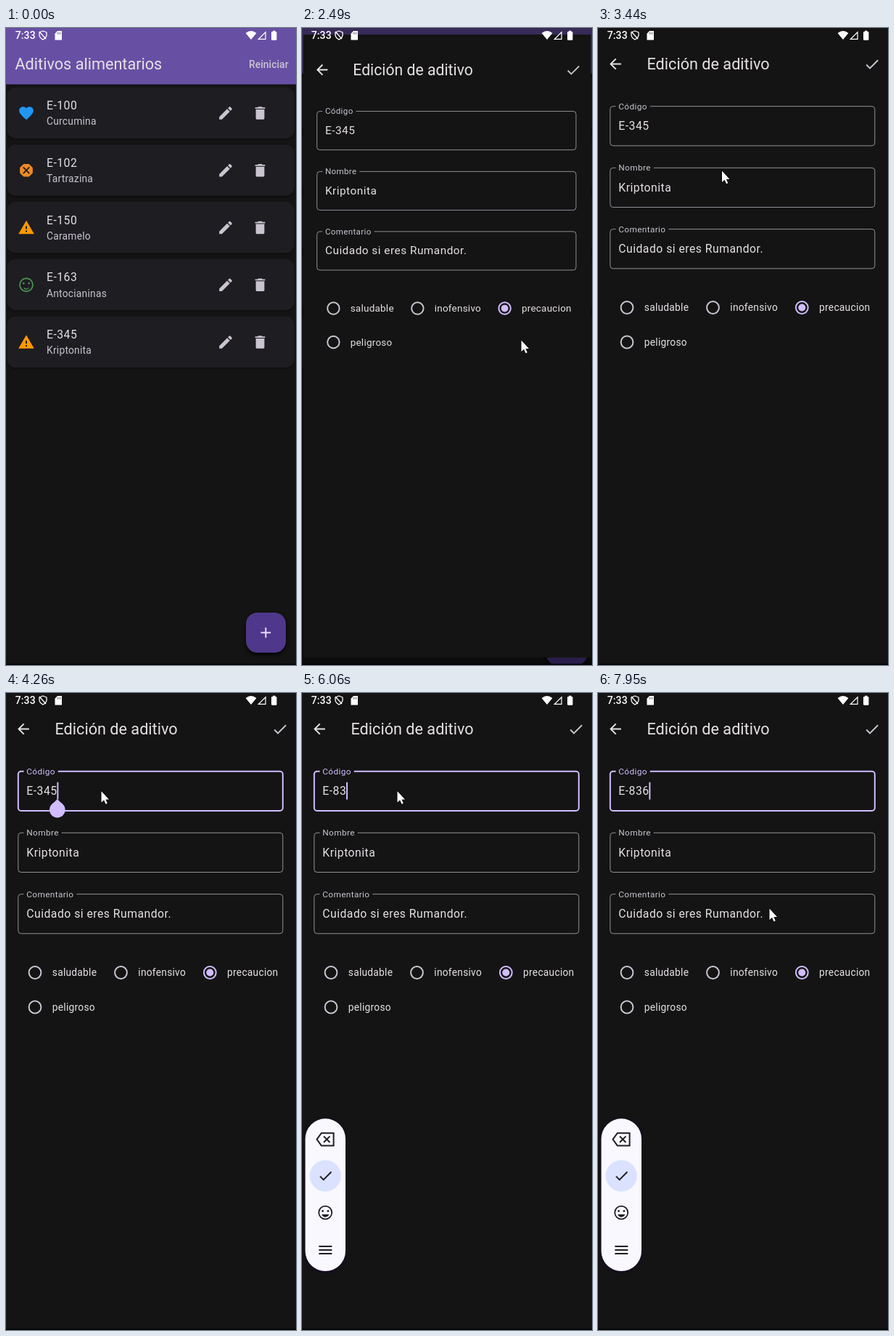
An HTML page with a canvas that plays this animation: 400 by 876 pixels, repeating every 8000 ms.

```html
<!DOCTYPE html>
<html lang="es">
<head>
<meta charset="utf-8">
<title>Aditivos alimentarios</title>
<style>
html, body { margin: 0; width: 100%; height: 100%; overflow: hidden; background: #141414; }
canvas { display: block; width: 400px; height: 876px; }
</style>
</head>
<body>
<canvas id="stage"></canvas>
<script>
const LOOP = 8000, W = 400, H = 876;
const canvas = document.getElementById('stage');
const ctx = canvas.getContext('2d');
const dpr = window.devicePixelRatio || 1;
canvas.width = W * dpr;
canvas.height = H * dpr;

const C = {
  bg: '#141414', card: '#1d1d22', bar: '#6750a4', fab: '#4f378b', accent: '#d0bcff',
  text: '#e6e1e5', soft: '#cac4d0', line: '#938f99', ink: '#1f1f23', pill: '#faf8ff'
};

const paths = {
  heart: 'M12 21.35l-1.45-1.32C5.4 15.36 2 12.28 2 8.5 2 5.42 4.42 3 7.5 3c1.74 0 3.41.81 4.5 2.09C13.09 3.81 14.76 3 16.5 3 19.58 3 22 5.42 22 8.5c0 3.78-3.4 6.86-8.55 11.54z',
  danger: 'M15.73 3H8.27L3 8.27v7.46L8.27 21h7.46L21 15.73V8.27zM17 15.74L15.74 17 12 13.26 8.26 17 7 15.74 10.74 12 7 8.26 8.26 7 12 10.74 15.74 7 17 8.26 13.26 12z',
  warning: 'M1 21h22L12 2zm12-3h-2v-2h2zm0-4h-2v-4h2z',
  edit: 'M3 17.25V21h3.75L17.81 9.94l-3.75-3.75zM20.71 7.04c.39-.39.39-1.02 0-1.41l-2.34-2.34c-.39-.39-1.02-.39-1.41 0l-1.83 1.83 3.75 3.75z',
  trash: 'M6 19c0 1.1.9 2 2 2h8c1.1 0 2-.9 2-2V7H6zM19 4h-3.5l-1-1h-5l-1 1H5v2h14z',
  add: 'M19 13h-6v6h-2v-6H5v-2h6V5h2v6h6z',
  back: 'M20 11H7.83l5.59-5.59L12 4l-8 8 8 8 1.41-1.41L7.83 13H20z',
  check: 'M9 16.17L4.83 12l-1.42 1.41L9 19 21 7l-1.41-1.41z',
  menu: 'M3 18h18v-2H3zM3 13h18v-2H3zM3 6v2h18V6z'
};
const icons = {};
for (const k in paths) icons[k] = new Path2D(paths[k]);

function icon(name, cx, cy, color, size = 23.6) {
  const s = size / 24;
  ctx.save();
  ctx.translate(cx - size / 2, cy - size / 2);
  ctx.scale(s, s);
  ctx.fillStyle = color;
  ctx.fill(icons[name], 'evenodd');
  ctx.restore();
}

function text(str, x, y, size, color, spacing = 0, weight = 400) {
  ctx.font = `${weight} ${size}px Roboto, sans-serif`;
  ctx.letterSpacing = spacing + 'px';
  ctx.fillStyle = color;
  ctx.fillText(str, x, y);
  return ctx.measureText(str).width;
}

function box(x, y, w, h, r, color) {
  ctx.beginPath();
  ctx.roundRect(x, y, w, h, r);
  ctx.fillStyle = color;
  ctx.fill();
}

function disc(x, y, r, color) {
  ctx.beginPath();
  ctx.arc(x, y, r, 0, 7);
  ctx.fillStyle = color;
  ctx.fill();
}

function ring(x, y, r, width, color) {
  ctx.beginPath();
  ctx.arc(x, y, r, 0, 7);
  ctx.lineWidth = width;
  ctx.strokeStyle = color;
  ctx.stroke();
}

function line(points, width, color, close) {
  ctx.beginPath();
  for (let i = 0; i < points.length; i += 2) ctx.lineTo(points[i], points[i + 1]);
  if (close) ctx.closePath();
  ctx.lineWidth = width;
  ctx.strokeStyle = color;
  ctx.stroke();
}

function shade(color, blur, dy) {
  ctx.shadowColor = color;
  ctx.shadowBlur = blur * dpr;
  ctx.shadowOffsetY = dy * dpr;
}

function face(cx, cy, r, color, mouth) {
  ring(cx, cy, r, 1.8, color);
  disc(cx - 3.7, cy - 2.2, 1.4, color);
  disc(cx + 3.7, cy - 2.2, 1.4, color);
  mouth();
}

// Number of the current step (0 before the start, n from the end on)
function stepOf(t, t0, t1, n) {
  if (t < t0) return 0;
  return Math.min(n, 1 + Math.floor((t - t0) / (t1 - t0) * (n - 1) + 0.02));
}

// [start, end, steps, points evenly spread over the steps]
const moves = [
  [800, 1560, 12, [372, 581, 344, 508, 319, 455, 306, 434, 302.5, 429.5]],
  [2880, 2950, 2, [291, 426, 301.5, 428]],
  [3160, 3860, 11, [290, 410, 231, 300, 171, 196.5, 132, 141, 117, 120, 131.5, 135]],
  [7260, 7810, 9, [133, 139, 148, 208, 163, 278, 169, 295.5]],
  [7880, 7950, 2, [205, 296, 236.5, 296.5]]
];

function mouseAt(t) {
  let pos = null;
  for (const [t0, t1, n, p] of moves) {
    const k = stepOf(t, t0, t1, n);
    if (!k) break;
    const legs = p.length / 2 - 1;
    const u = (k - 1) / (n - 1) * legs;
    const i = Math.min(legs - 1, Math.floor(u)), f = u - i;
    pos = [0, 1].map(a => p[2 * i + a] + (p[2 * i + 2 + a] - p[2 * i + a]) * f);
  }
  return pos;
}

function drawMouse([x, y]) {
  ctx.save();
  ctx.translate(x, y);
  const shape = [0, 0, 0, 15.5, 3.6, 12.2, 6, 17.8, 8.3, 16.8, 6, 11.4, 10.6, 11.4];
  line(shape, 1.2, '#000', true);
  ctx.fillStyle = '#fff';
  ctx.fill();
  ctx.restore();
}

function drawStatus() {
  const w = '#fff';
  text('7:33', 12.7, 15.2, 14, w, 0.1, 500);
  ctx.lineJoin = 'round';
  line([46, 6, 51, 4, 56, 6, 56, 10.5, 54.5, 13.5, 51, 16, 47.5, 13.5, 46, 10.5], 1.3, w, true);
  line([46, 5, 55, 15], 1.3, w);
  ctx.lineJoin = 'miter';
  ctx.fillStyle = w;
  ctx.beginPath();
  ctx.moveTo(71, 4); ctx.lineTo(77, 4); ctx.lineTo(77, 16.5); ctx.lineTo(67.5, 16.5); ctx.lineTo(67.5, 7.8);
  ctx.fill();
  for (const x of [71, 73, 75]) { ctx.fillStyle = 'rgba(40,35,55,.7)'; ctx.fillRect(x - 0.4, 6, 0.9, 2.6); }
  ctx.fillStyle = w;
  ctx.beginPath();
  ctx.moveTo(338, 16);
  ctx.lineTo(330.6, 7);
  ctx.quadraticCurveTo(338, 1.2, 345.4, 7);
  ctx.fill();
  line([358, 5.8, 358, 15.3, 348.3, 15.3], 1.2, w, true);
  box(366, 5, 7.4, 11.8, 1, w);
  ctx.fillRect(368, 3.7, 3.4, 2);
}

const items = [
  ['E-100', 'Curcumina', 'heart', '#2196f3'],
  ['E-102', 'Tartrazina', 'danger', '#ef8a24'],
  ['E-150', 'Caramelo', 'warning', '#ff9800'],
  ['E-163', 'Antocianinas', 'face', '#4c8f50'],
  ['E-345', 'Kriptonita', 'warning', '#ff9800']
];

function drawList(ripple) {
  ctx.fillStyle = C.bg;
  ctx.fillRect(-3, 0, 406, H);
  ctx.fillStyle = C.bar;
  ctx.fillRect(-3, 0, 406, 77.5);
  text('Aditivos alimentarios', 12.5, 57, 21.65, C.text);
  text('Reiniciar', 335, 55, 13.78, C.soft, 0.1, 500);
  items.forEach(([code, name, sign, color], i) => {
    const y = 81.6 + 78.75 * i, mid = y + 35.4;
    ctx.save();
    shade('rgba(0,0,0,.5)', 2, 1);
    box(1.3, y, 396.6, 70.4, 11.8, C.card);
    ctx.restore();
    if (sign === 'face') {
      face(28, mid, 9, color, () => {
        ctx.beginPath();
        ctx.arc(28, mid + 2.2, 3.6, 0.5, 2.64);
        ctx.lineWidth = 1.4;
        ctx.stroke();
      });
    } else {
      icon(sign, 28, mid, color);
    }
    text(code, 56, y + 30.6, 15.74, C.text, 0.49);
    text(name, 56, y + 51.8, 13.78, C.soft, 0.25);
    if (ripple && i === 4) disc(302, 431, 5 + 3.7 * ripple, 'rgba(202,196,208,.12)');
    icon('edit', 303, mid, C.soft);
    icon('trash', 350.5, mid, C.soft);
  });
  ctx.save();
  shade('rgba(0,0,0,.8)', 5, 3);
  box(331, 804, 55, 55, 15.7, C.fab);
  ctx.restore();
  icon('add', 358.3, 831.5, '#eaddff');
}

function drawField(y, label, value, focus) {
  const left = 16.8, right = 381.8, h = 54.2, r = 4;
  const w = text(label, 28.3, y + 4, 11.8, focus ? C.accent : C.soft, 0.37);
  ctx.beginPath();
  ctx.moveTo(28.3 + w + 4, y);
  ctx.arcTo(right, y, right, y + h, r);
  ctx.arcTo(right, y + h, left, y + h, r);
  ctx.arcTo(left, y + h, left, y, r);
  ctx.arcTo(left, y, 24.5, y, r);
  ctx.lineTo(24.5, y);
  ctx.lineWidth = 1 + focus;
  ctx.strokeStyle = focus ? C.accent : C.line;
  ctx.stroke();
  return text(value, 28.3, y + 32.2, 15.74, C.text, 0.49);
}

const radios = [
  ['saludable', 40, 384.5], ['inofensivo', 158.5, 384.5],
  ['precaucion', 281.3, 384.5, true], ['peligroso', 40, 432]
];

// [from, code, caret shown]
const typing = [
  [0, 'E-345', 0], [4060, 'E-345', 1], [4530, 'E-345', 0], [4920, 'E-345', 1],
  [4990, 'E-34', 1], [5130, 'E-3', 1], [5330, 'E-', 1], [5790, 'E-', 0],
  [5860, 'E-8', 1], [6060, 'E-83', 1], [6590, 'E-836', 1], [7060, 'E-836', 0], [7560, 'E-836', 1]
];

function drawHandle(x, y) {
  ctx.save();
  ctx.translate(x, y);
  disc(0, 0, 10.8, C.accent);
  ctx.beginPath();
  ctx.moveTo(0, -14.6);
  ctx.lineTo(7.8, -7);
  ctx.lineTo(-7.8, -7);
  ctx.fill();
  ctx.restore();
}

function drawForm(t) {
  ctx.fillStyle = C.bg;
  ctx.fillRect(-2.5, 0, 405, 875);
  icon('back', 24, 49.5, C.text);
  text('Edición de aditivo', 67.5, 56.8, 21.65, C.text);
  icon('check', 378, 49.8, C.soft);
  const focus = stepOf(t, 4060, 4190, 3) / 3;
  const [, code, caret] = typing.filter(s => s[0] <= t).pop();
  const w = drawField(107.7, 'Código', code, focus);
  drawField(192.3, 'Nombre', 'Kriptonita', 0);
  drawField(276.6, 'Comentario', 'Cuidado si eres Rumandor.', 0);
  if (caret) {
    ctx.fillStyle = C.accent;
    ctx.fillRect(28.1 + w, 122.7, 2, 23.8);
  }
  if (t >= 4130 && t < 4990) drawHandle(70.8, 160.6);
  for (const [name, x, y, on] of radios) {
    ring(x, y, 8.4, 2, on ? C.accent : C.soft);
    if (on) disc(x, y, 5, C.accent);
    text(name, x + 23.8, y + 4.6, 13.78, C.text, 0.25);
  }
}

function drawKeyboard(p) {
  ctx.save();
  ctx.globalAlpha = p;
  ctx.save();
  shade('rgba(20,5,45,.9)', 5, 1);
  box(4.5, 585.3, 55.5, 209.7, 27.7, C.pill);
  ctx.restore();
  disc(32.2, 664, 21.7, '#dae2ff');
  line([20.5, 613.8, 26.7, 605.2, 43.6, 605.2, 43.6, 622.4, 26.7, 622.4], 2, C.ink, true);
  line([30, 609.6, 38.4, 618], 2, C.ink);
  line([38.4, 609.6, 30, 618], 2, C.ink);
  icon('check', 32.5, 664, C.ink, 23);
  face(32.2, 714.6, 9, C.ink, () => {
    ctx.beginPath();
    ctx.arc(32.2, 715.6, 5.2, 0.25, Math.PI - 0.25);
    ctx.closePath();
    ctx.fillStyle = C.ink;
    ctx.fill();
  });
  icon('menu', 32.3, 766, C.ink, 24);
  ctx.restore();
}

function zoom(s) {
  ctx.translate(200, 434);
  ctx.scale(s, s);
  ctx.translate(-200, -434);
}

const opening = [0, 0.85, 0.95, 0.99, 1];

function draw(t) {
  ctx.setTransform(dpr, 0, 0, dpr, 0, 0);
  ctx.fillStyle = '#000';
  ctx.fillRect(0, 0, W, H);
  const p = opening[stepOf(t, 2490, 2690, 4)];
  if (p < 1) {
    ctx.save();
    zoom(1 + 0.049 * p);
    drawList(stepOf(t, 2160, 2350, 3));
    ctx.restore();
  }
  if (p > 0) {
    ctx.fillStyle = `rgba(0,0,0,${0.55 * p})`;
    ctx.fillRect(0, 0, W, H);
    ctx.save();
    zoom(0.86 + 0.14 * p);
    drawForm(t);
    ctx.restore();
  }
  const keys = stepOf(t, 4460, 4660, 4) / 4;
  if (keys) drawKeyboard(keys);
  drawStatus();
  ctx.fillStyle = '#000';
  ctx.fillRect(0, 874.4, W, 2);
  const mouse = mouseAt(t);
  if (mouse) drawMouse(mouse);
}

const start = performance.now();
function tick() {
  draw((performance.now() - start) % LOOP);
  requestAnimationFrame(tick);
}
tick();
</script>
</body>
</html>
```
